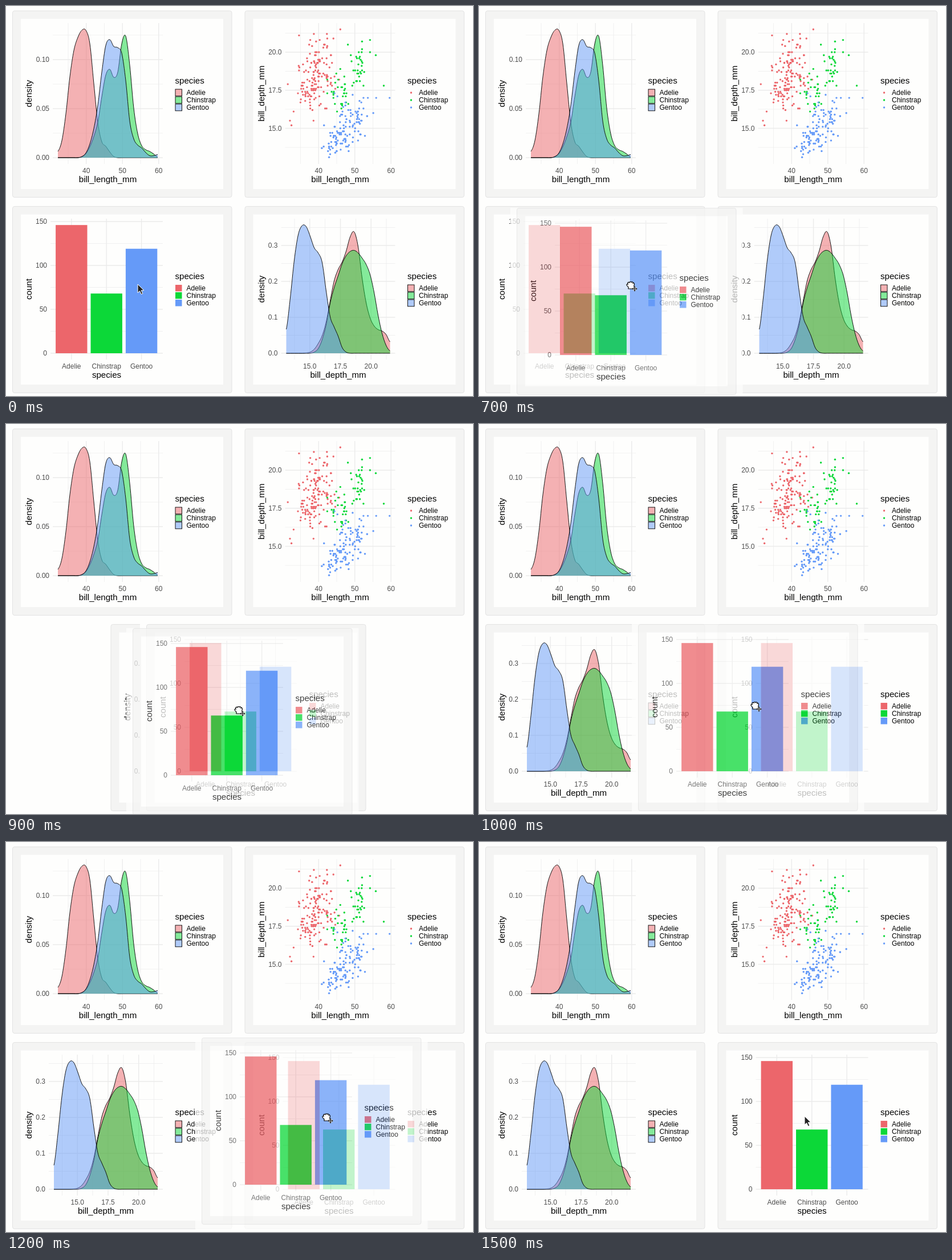
An HTML page that plays this animation: 819x684 px, repeating every 2200 ms.

```html
<!DOCTYPE html>
<html lang="en">
<head>
<meta charset="utf-8">
<title>Reordering chart cards</title>
<style>
  html, body { margin: 0; width: 100%; height: 100%; overflow: hidden; background: #fefefd; }
  svg { display: block; font: 12px "Liberation Sans", Arial, sans-serif; }
  .title { font-size: 15.1px; }
  .tick { fill: #4d4d4d; }
  .grid { stroke: #ebebeb; }
  .curve { fill: none; stroke: #000; stroke-width: .9; }
</style>
</head>
<body>
<svg id="stage" width="819" height="684" viewBox="0 0 819 684"></svg>
<script>
const COLUMN = 407.5, ROW = 343, BASE = 266, LOOP = 2200;
const SPECIES = ['Adelie', 'Chinstrap', 'Gentoo'];
const COLORS = ['#ec666b', '#0cd838', '#659af8'];

const text = (x, y, label, anchor = 'start', cls = '') =>
  `<text x="${x}" y="${y}" text-anchor="${anchor}" class="${cls}">${label}</text>`;
const rect = (x, y, w, h, attrs) =>
  `<rect x="${x}" y="${y}" width="${w}" height="${h}" ${attrs}/>`;

// Ticks are [position, label] pairs; minor lines are plain positions.
function axes({ left, right = 275, xTicks, yTicks, xMinor = [], yMinor, xTitle, yTitle }) {
  const vertical = (x, w) => `<path class="grid" stroke-width="${w}" d="M${x} 30V277"/>`;
  const horizontal = (y, w) => `<path class="grid" stroke-width="${w}" d="M${left} ${y}H${right}"/>`;
  return xMinor.map(x => vertical(x, .7)).join('') +
    yMinor.map(y => horizontal(y, .7)).join('') +
    xTicks.map(([x, label]) => vertical(x, 1.4) + text(x, 293, label, 'middle', 'tick')).join('') +
    yTicks.map(([y, label]) => horizontal(y, 1.4) + text(left - 6, y + 4.2, label, 'end', 'tick')).join('') +
    text((left + right) / 2, 309, xTitle, 'middle', 'title') +
    `<g transform="translate(45 153.5) rotate(-90)">${text(0, 0, yTitle, 'middle', 'title')}</g>`;
}

function legend(key) {
  return text(296.5, 136, 'species', 'start', 'title') + SPECIES.map((name, i) =>
    key(COLORS[i], 146 + 13 * i) + text(316.5, 156 + 13 * i, name)).join('');
}

const outlinedKey = (color, y) => rect(297, y, 11.5, 11.8,
  `fill="${color}" fill-opacity=".5" stroke="#000" stroke-width=".9"`);
const solidKey = (color, y) => rect(297, y, 11.5, 11.5, `fill="${color}"`);
const dotKey = (color, y) => `<circle cx="303" cy="${y + 6}" r="1.7" fill="${color}"/>`;

// Smooth curve through heights spaced evenly above the baseline.
function density(left, count, first, heights, color) {
  const step = 7;
  const y = i => BASE - (heights[Math.max(0, Math.min(count, i)) - first] || 0);
  const x = i => left + step * i;
  let d = `M${x(0)} ${y(0)}`;
  for (let i = 0; i < count; i++) {
    const slopeA = (y(i + 1) - y(i - 1)) / 6, slopeB = (y(i + 2) - y(i)) / 6;
    d += `C${x(i) + step / 3} ${y(i) + slopeA} ${x(i + 1) - step / 3} ${y(i + 1) - slopeB} ${x(i + 1)} ${y(i + 1)}`;
  }
  return `<path d="${d}V${BASE}H${left}Z" fill="${color}" fill-opacity=".5"/><path class="curve" d="${d}"/>`;
}

const lengthAxis = {
  left: 82, xTitle: 'bill_length_mm', xMinor: [109, 172.5, 236],
  xTicks: [[140.7, '40'], [204.2, '50'], [267.7, '60']]
};

function lengthChart() {
  const adelie = [11, 30, 77, 142, 188, 211, 223.5, 223.5, 200, 130, 62, 28, 20, 10, 2];
  const chinstrap = [1.5, 7, 19, 37, 62, 107, 145, 155, 141, 150, 200, 213, 162, 87, 42, 21, 14, 11, 6.5, 1];
  const gentoo = [2, 8, 24, 51, 92, 150, 197, 207, 195, 193, 183, 135, 64, 33, 22, 17, 9, 3.5, 3.5, 5.5];
  return axes({
    ...lengthAxis, yTitle: 'density', yMinor: [223, 137, 51],
    yTicks: [[266, '0.00'], [180, '0.05'], [94, '0.10']]
  }) + density(91, 25, 0, adelie, COLORS[0]) + density(91, 25, 6, chinstrap, COLORS[1]) +
    density(91, 25, 6, gentoo, COLORS[2]) + legend(outlinedKey);
}

function depthChart() {
  const adelie = [.5, 2, 7, 17, 31, 55, 92, 127, 147, 160, 179, 204, 213, 187, 132, 89, 62, 48, 41.5, 39, 33, 20];
  const chinstrap = [2, 8, 24, 50, 88, 115, 136, 157, 171, 178.5, 180.5, 176, 167, 156, 138, 107, 67, 35, 14, 4];
  const gentoo = [42, 97, 163, 208, 224, 222, 205, 185, 176, 159, 109, 64, 46, 30, 10, 2];
  return axes({
    left: 75, xTitle: 'bill_depth_mm', yTitle: 'density',
    xMinor: [98.5, 152, 206, 259.5], yMinor: [234.5, 171.5, 108.5, 45.5],
    xTicks: [[125.2, '15.0'], [179, '17.5'], [232.7, '20.0']],
    yTicks: [[266, '0.0'], [203, '0.1'], [140, '0.2'], [77, '0.3']]
  }) + density(84, 26, 5, adelie, COLORS[0]) + density(84, 26, 7, chinstrap, COLORS[1]) +
    density(84, 26, 0, gentoo, COLORS[2]) + legend(outlinedKey);
}

function scatterChart() {
  let seed = 11;
  const random = () => (seed = (seed * 16807) % 2147483647) / 2147483647;
  const normal = () => (random() + random() + random() - 1.5) * 2;
  const dot = (length, depth, color) => `<circle cx="${(140.7 + 6.35 * (length - 40)).toFixed(1)}"
    cy="${(81 + 26.7 * (20 - depth)).toFixed(1)}" r="1.7" fill="${color}"/>`;
  const tenth = v => Math.round(v * 10) / 10;
  // species, count, mean length, mean depth, length spread, depth spread
  const clusters = [
    [0, 72, 37.3, 17.6, 2, .92], [0, 72, 40.4, 19, 2.2, .95],
    [1, 31, 46.4, 17.6, 1.6, .75], [1, 32, 51, 19.2, 1.4, .7],
    [2, 58, 45.6, 14.25, 1.9, .52], [2, 57, 49.4, 15.7, 1.9, .68]
  ];
  const outliers = [
    [[32.1, 15.5], [33.1, 16.1], [34.6, 21.1], [46, 21.5], [42.3, 21.2], [38.7, 21.2], [40.3, 20.8]],
    [[54.2, 20.8], [52, 20.7], [55.8, 19.8], [58, 17.8], [42.4, 17.3]],
    [[59.6, 17], [55.9, 17], [55.1, 16], [52.4, 17], [42.9, 13.1], [44.4, 17.3], [40.9, 13.7], [53.4, 15.8]]
  ];
  const dots = clusters.map(([s, count, length, depth, lengthSpread, depthSpread]) =>
    Array.from({ length: count }, () => dot(
      tenth(length + lengthSpread * normal()),
      tenth(Math.max(13.2, depth + depthSpread * normal())), COLORS[s])).join('')).join('');
  const extremes = outliers.map((list, s) => list.map(p => dot(...p, COLORS[s])).join('')).join('');
  return axes({
    ...lengthAxis, yTitle: 'bill_depth_mm', yMinor: [248, 181, 114.5, 47.7],
    yTicks: [[214.5, '15.0'], [147.8, '17.5'], [81, '20.0']]
  }) + dots + extremes + legend(dotKey);
}

function countChart() {
  const centers = [114.8, 176.2, 237.6];
  const bars = [146, 68, 119].map((n, i) =>
    rect(centers[i] - 27.7, BASE - 1.54 * n, 55.4, 1.54 * n, `fill="${COLORS[i]}"`)).join('');
  return axes({
    left: 78, xTitle: 'species', yTitle: 'count', yMinor: [227.5, 150.5, 73.5],
    xTicks: SPECIES.map((name, i) => [centers[i], name]),
    yTicks: [[266, '0'], [189, '50'], [112, '100'], [35, '150']]
  }) + bars + legend(solidKey);
}

const card = (id, x, y, chart) => `<g id="${id}" transform="translate(${x} ${y})">
  ${rect(0, 8, COLUMN, ROW, 'fill="#fefefd"')}
  ${rect(11.5, 8.5, 384.5, 327, 'rx="3.5" fill="#f4f4f3" stroke="#e3e3e3"')}
  ${rect(26, 22.5, 355, 298.5, 'fill="#fefefd"')}${chart}</g>`;

const stage = document.getElementById('stage');
stage.innerHTML =
  card('length', 0, 0, lengthChart()) + card('scatter', COLUMN, 0, scatterChart()) +
  card('depth', COLUMN, ROW, depthChart()) + card('count', 0, ROW, countChart()) +
  `<g id="dragged" opacity=".75">${card('copy', 0, ROW, countChart())}</g>
  <path id="arrow" d="M0 0V15L3.6 11.8 6.2 17.6 8.8 16.4 6.2 10.8H11Z" fill="#222" stroke="#fff"/>
  <g id="hand">
    <path d="M-4 6V3C-8 0-8-3-5-2-6-6-3-6-2-5-2-7 1-7 1-5 2-7 5-6 4-4 6-5 7-3 6 0 6 2 5 3 5 6Z"
      fill="#fff" stroke="#000" stroke-width="1.2"/>
    <g transform="translate(7 6)">
      <path d="M-4 0H4M0-4V4" stroke="#fff" stroke-width="3.5"/>
      <path d="M-3 0H3M0-3V3" stroke="#000" stroke-width="1.1"/>
      <path d="M-4.5 0l2-2v4zM4.5 0l-2-2v4zM0-4.5l-2 2h4zM0 4.5l-2-2h4z"/>
    </g>
  </g>`;

const byId = id => document.getElementById(id);
const move = (id, x, y) => byId(id).setAttribute('transform', `translate(${x} ${y})`);
const show = (id, on) => byId(id).setAttribute('visibility', on ? 'visible' : 'hidden');

// Each pose holds until the next one starts; poses without a drag show the arrow.
const poses = [
  { at: 0, swap: 0, cursor: [231, 488] },
  { at: 600, swap: 0, drag: [26, 0], cursor: [248, 491] },
  { at: 700, swap: 0, drag: [55, 3], cursor: [266, 490] },
  { at: 800, swap: 0, drag: [96, 7.5], cursor: [295, 492] },
  { at: 900, swap: 235, drag: [211, 7], cursor: [408, 502] },
  { at: 1000, swap: COLUMN, drag: [268, 0], cursor: [484, 494] },
  { at: 1100, swap: COLUMN, drag: [316, -7.5], cursor: [544, 484] },
  { at: 1200, swap: COLUMN, drag: [332, -8], cursor: [562, 483] },
  { at: 1300, swap: COLUMN, drag: [339.5, -8.5], cursor: [571, 482] },
  { at: 1500, swap: COLUMN, cursor: [571, 481] }
];

let current;
function render() {
  const time = performance.now() % LOOP;
  const pose = poses.findLast(p => p.at <= time);
  if (pose !== current) {
    current = pose;
    const { swap, drag, cursor } = pose;
    move('count', swap, ROW);
    move('depth', COLUMN - swap, ROW);
    move('dragged', ...(drag || [0, 0]));
    show('dragged', drag);
    show('hand', drag);
    show('arrow', !drag);
    move(drag ? 'hand' : 'arrow', ...cursor);
  }
  requestAnimationFrame(render);
}
render();
</script>
</body>
</html>
```
